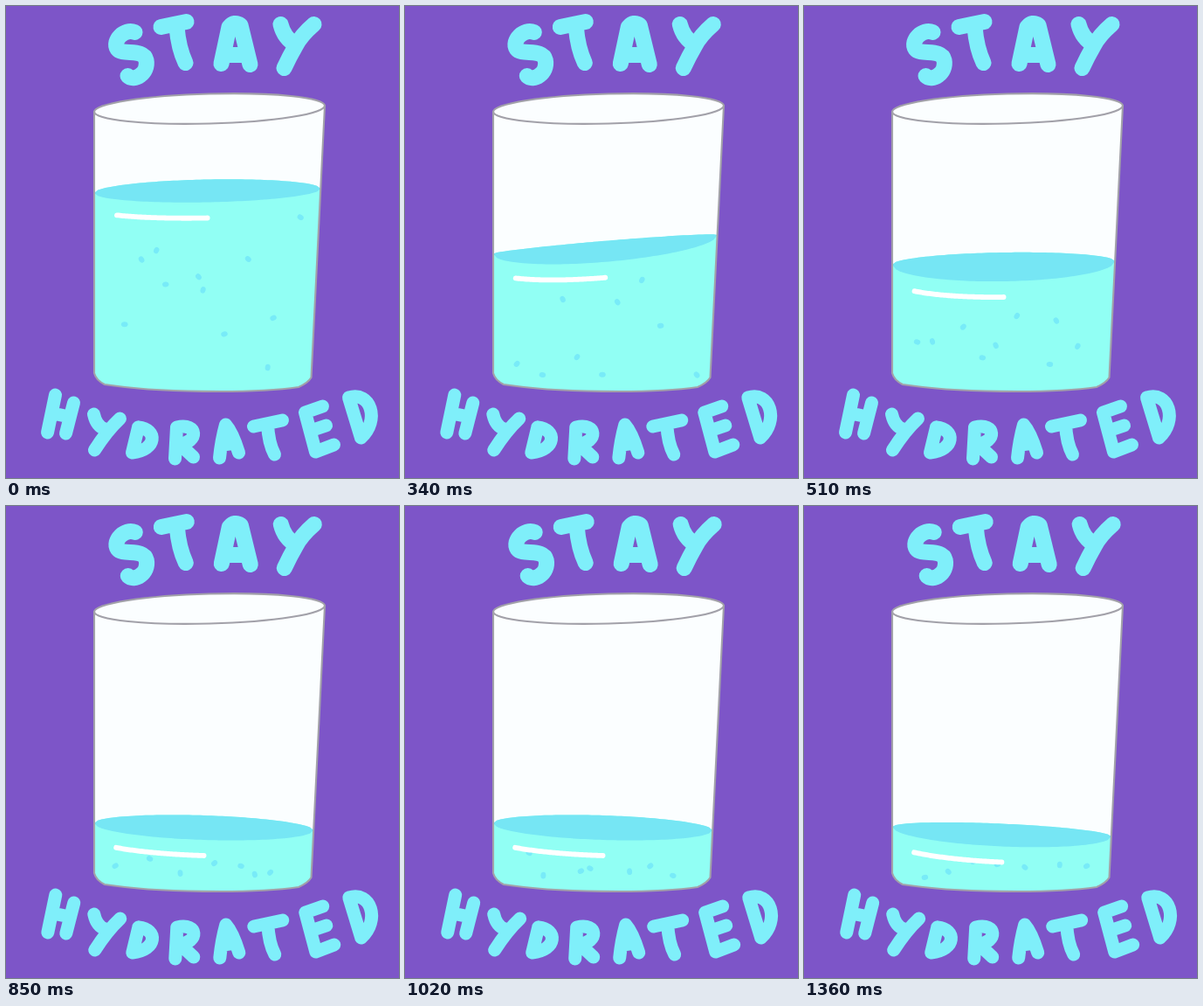
Recreate the animation shown at these times as an HTML page with a canvas. Size 450 by 540 pixels, loop 1.53 s.

```html
<!DOCTYPE html>
<html lang="en">
<head>
<meta charset="utf-8">
<title>Stay hydrated</title>
<style>
html, body { margin: 0; width: 100%; height: 100%; overflow: hidden; background: #7d55c8; }
canvas { display: block; }
</style>
</head>
<body>
<canvas id="stage" width="450" height="540" role="img" aria-label="STAY HYDRATED"></canvas>
<script>
const ctx = document.getElementById('stage').getContext('2d');
const STEP = 170;
const STEPS = 9;
const COLOR = {
  back: '#7d55c8', letter: '#7feffa', glass: '#fbfeff', line: '#a2a1a9',
  water: '#91fff4', surface: '#76e6f4', dot: '#78ebf8'
};

// Centre lines of the hand-drawn letters, one line per letter
const stay = new Path2D(`
  M148 30C136 25 122 40 128 49C134 57 158 48 161 62C164 77 147 87 140 80
  M178 24Q192 21 207 18M196 24Q198 48 206 65
  M247 66L256 24Q262 17 269 22L280 67M254 56L273 56
  M315 21Q319 37 332 44M353 21Q338 34 332 46Q325 58 319 71`);
const hydrated = new Path2D(`
  M57 445L48 488M78 454L69 489M54 466L73 470
  M101 467Q104 481 114 484M131 472Q116 486 102 508
  M152 482L145 511M152 482C174 484 174 508 145 511
  M196 482L194 518M196 482C221 476 221 500 199 501L215 516
  M245 517Q247 497 252 479Q260 488 267 511M249 502L263 500
  M284 481L317 474M300 478Q301 500 308 513
  M343 465L355 510M343 465L363 458M349 486L367 480M355 510L376 502
  M393 448L407 494M393 448C418 440 429 474 407 494`);

const rim = new Path2D();
rim.ellipse(233, 117.5, 132, 17, -0.027, 0, Math.PI * 2);
const cup = new Path2D(
  'M101 121L101 420Q103 428 113 433C170 442 280 444 335 436Q346 431 349.5 425L365 114');

// Water line: step, left height, right height, rise of back edge, drop of front edge
const keys = [
  [0, 214, 209, 13, 13],
  [1, 271, 232, -4, 19],
  [3, 296, 292, 12, 21],
  [5, 363, 371, 13, 15],
  [7, 363, 371, 13, 15],
  [8, 367, 378, 9, 17]
];

const lerp = (a, b, t) => a + (b - a) * t;

function waterLine(step) {
  const next = Math.max(1, keys.findIndex(k => k[0] >= step));
  const a = keys[next - 1], b = keys[next];
  const t = (step - a[0]) / (b[0] - a[0]);
  const [left, right, rise, drop] = a.slice(1).map((v, i) => lerp(v, b[i + 1], t));
  const wall = 365 - (right - 114) / 20;
  const round = u => Math.sqrt(Math.max(0, 4 * u * (1 - u)));
  return {
    x: u => lerp(101, wall, u),
    back: u => lerp(left, right, u) - rise * round(u),
    front: u => lerp(left, right, u) + drop * round(u)
  };
}

function random(seed) {
  const v = Math.sin(seed * 127.1 + 11.7) * 43758.5453;
  return v - Math.floor(v);
}

// Adds the curve y(u) from u = a to u = b
function trace(path, x, y, a, b) {
  for (let i = 0; i <= 60; i++) {
    const u = lerp(a, b, i / 60);
    path.lineTo(x(u), y(u));
  }
}

function bubbles({ x, front }, step) {
  const count = Math.round(6 + (430 - front(0.5)) / 45);
  ctx.fillStyle = COLOR.dot;
  for (let i = 0; i < count; i++) {
    const seed = step * 20 + i;
    const u = lerp(0.08, 0.92, (i + random(seed)) / count);
    const y = lerp(front(u) + 18, 425, random(seed + 0.5));
    ctx.beginPath();
    ctx.ellipse(x(u), y, 3.8, 3, seed, 0, Math.PI * 2);
    ctx.fill();
  }
}

function water(step) {
  const line = waterLine(step);
  const { x, back, front } = line;
  ctx.save();
  ctx.clip(cup);

  const fill = new Path2D();
  trace(fill, x, back, 0, 1);
  fill.lineTo(370, 450);
  fill.lineTo(95, 450);
  ctx.fillStyle = COLOR.water;
  ctx.fill(fill);

  const surface = new Path2D();
  trace(surface, x, back, 0, 1);
  trace(surface, x, front, 1, 0);
  ctx.fillStyle = COLOR.surface;
  ctx.fill(surface);

  bubbles(line, step);

  const shine = new Path2D();
  trace(shine, x, u => front(u) + 18, 0.1, 0.5);
  stroke(shine, '#fff', 5.8);
  ctx.restore();
}

function stroke(path, color, width) {
  ctx.strokeStyle = color;
  ctx.lineWidth = width;
  ctx.stroke(path);
}

// The lettering cycles through slightly shifted drawings
function lettering(step) {
  const drawing = step < 6 ? step % 3 : 1 + step % 2;
  ctx.save();
  ctx.translate([-0.5, 0.7, -0.2][drawing], 0);
  stroke(stay, COLOR.letter, 18);
  stroke(hydrated, COLOR.letter, 15);
  ctx.restore();
}

function draw(now) {
  const step = Math.floor(now / STEP) % STEPS;
  ctx.lineCap = ctx.lineJoin = 'round';
  ctx.fillStyle = COLOR.back;
  ctx.fillRect(0, 0, 450, 540);
  lettering(step);

  ctx.fillStyle = COLOR.glass;
  ctx.fill(cup);
  ctx.fill(rim);
  water(step);
  stroke(cup, COLOR.line, 2.1);
  stroke(rim, COLOR.line, 2.1);
}

const start = performance.now();
function tick() {
  draw(performance.now() - start);
  requestAnimationFrame(tick);
}
tick();
</script>
</body>
</html>
```
